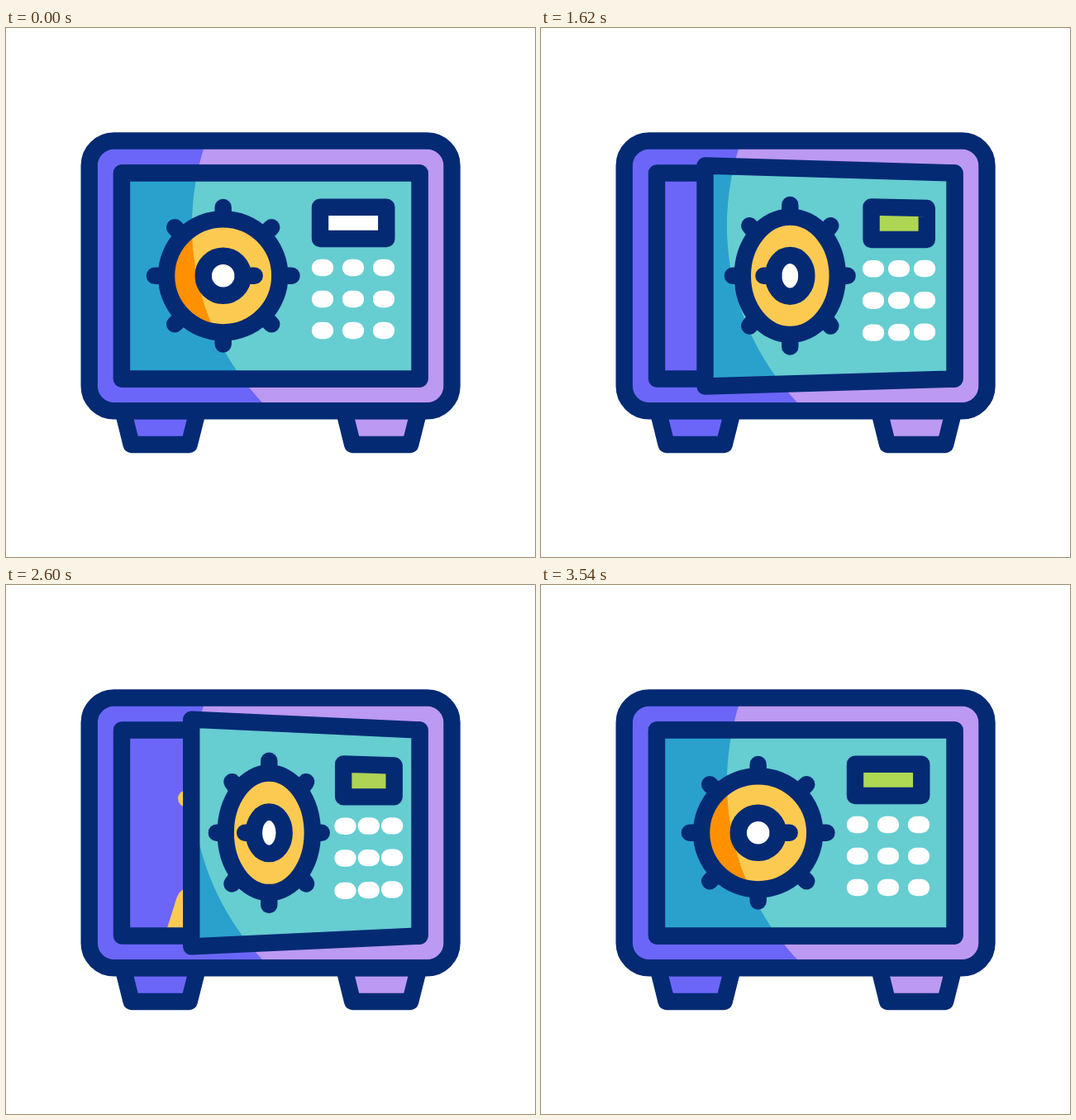
An HTML page with a canvas that plays this animation: 640x640 px, repeating every 3600 ms.

```html
<!DOCTYPE html>
<html lang="en">
<head>
<meta charset="utf-8">
<title>Safe</title>
<style>
html, body { margin: 0; width: 100%; height: 100%; overflow: hidden; background: #fff; }
canvas { display: block; }
</style>
</head>
<body>
<canvas id="stage" width="640" height="640"></canvas>
<script>
const ctx = document.getElementById('stage').getContext('2d');
const LOOP = 3600, HINGE = 500.5, DOOR_LEFT = 140, TOP = 175.5, BOTTOM = 424.5, MID = 299.8;
const NAVY = '#042a74', PURPLE = '#6b66f8', YELLOW = '#fdca51', ORANGE = '#ff9100';

// Every two-tone surface shares one fixed circular shadow edge.
function twoTone(light, dark) {
  const g = ctx.createRadialGradient(537, 239, 311.6, 537, 239, 312.4);
  g.addColorStop(0, light);
  g.addColorStop(1, dark);
  return g;
}
const BODY = twoTone('#bc99f3', PURPLE);
const DOOR = twoTone('#66cdd1', '#2aa1cd');
const DIAL = twoTone(YELLOW, ORANGE);

// Symmetric cubic-bezier(a, 0, 1 - a, 1) between two times.
function ease(t, from, to, a) {
  const x = Math.min(1, Math.max(0, (t - from) / (to - from)));
  let lo = 0, hi = 1;
  for (let i = 0; i < 24; i++) {
    const s = (lo + hi) / 2, r = 1 - s;
    if (3 * a * s * r * r + 3 * (1 - a) * s * s * r + s * s * s < x) lo = s; else hi = s;
  }
  return lo * lo * (3 - 2 * lo);
}

function paint(path, fill, stroke = NAVY) {
  if (fill) { ctx.fillStyle = fill; ctx.fill(path); }
  if (stroke) { ctx.strokeStyle = stroke; ctx.stroke(path); }
}

function shape(points, closed = true) {
  const p = new Path2D();
  points.forEach(([x, y]) => p.lineTo(x, y));
  if (closed) p.closePath();
  return p;
}

function ellipse(x, y, rx, ry) {
  const p = new Path2D();
  p.ellipse(x, y, rx, ry, 0, 0, 2 * Math.PI);
  return p;
}

function drawBody() {
  for (const x of [0, 267.5])
    paint(shape([[141.5 + x, 463], [151.7 + x, 504], [221.7 + x, 504], [232 + x, 463]]), BODY);
  const box = new Path2D();
  box.roundRect(100.7, 136.5, 438.8, 326.7, 30);
  paint(box, BODY);
}

function drawIngot(x, y, color) {
  ctx.save();
  ctx.translate(x, y);
  paint(new Path2D('M-43.5 0L-30-43Q-26-56-15-56H15Q26-56 30-43L43.5 0Z'), color, null);
  ctx.restore();
}

function drawStar(t) {
  const size = 70 * ease(t, 1600, 2000, 1 / 3) * (1 - ease(t, 2200, 2600, 1 / 3));
  const turn = (t - 1600) * 0.18 * Math.PI / 180;
  const star = new Path2D();
  for (let i = 0; i < 4; i++) {
    const a = turn + i * Math.PI / 2, b = a + Math.PI / 4, far = size * 1.414;
    star.arc(218.3 + far * Math.cos(b), 258.5 + far * Math.sin(b), size,
      b + Math.PI * 1.25, b + Math.PI * 0.75, true);
  }
  star.closePath();
  if (size < 0.5) paint(ellipse(218.3, 258.5, 10.2, 10.2), YELLOW, null);
  else paint(star, '#fff', YELLOW);
}

function drawInside(t) {
  const frame = shape([[DOOR_LEFT, TOP], [HINGE, TOP], [HINGE, BOTTOM], [DOOR_LEFT, BOTTOM]]);
  paint(frame, PURPLE, null);
  ctx.save();
  ctx.clip(frame);
  drawIngot(324.5, 311, YELLOW);
  for (const x of [280.5, 368.5]) drawIngot(x, 367, ORANGE);
  for (const x of [236, 324, 412]) drawIngot(x, 423, YELLOW);
  ctx.restore();
  paint(frame);
  drawStar(t);
}

function drawDial(px, scale, shift, turn) {
  const cx = px(262.7), tall = 1 + shift * 0.00063;
  const at = (r, a) => [cx + r * scale * Math.cos(a), MID + r * tall * Math.sin(a)];
  const spoke = (from, to, a) => paint(shape([at(from, a), at(to, a)], false));
  const ring = (r, fill) => paint(ellipse(cx, MID, r * scale, r * tall), fill);
  for (let i = 0; i < 8; i++) spoke(68.6, 82.8, turn + i * Math.PI / 4);
  ring(68.6, DIAL);
  ring(24, '#fff');
  spoke(24, 38, turn);
}

function drawPanel(px, shift, lit) {
  const k = shift / 241;
  for (let row = 0; row < 3; row++) {
    for (let col = 0; col < 3; col++) {
      const x = px(383 + 37 * col);
      const drop = [5, 7, 11][row] - col * [0.5, 1, 2][row];
      const y = 290 + 38 * row + drop * k;
      paint(shape([[x - 3, y], [x + 3, y]], false), null, '#fff');
    }
  }
  const fade = (shift / 262) ** 2;
  const color = lit ? `rgb(175,${216 - 50 * fade},${83 + 8 * fade})` : '#fff';
  paint(shape([[px(380), 216.8 - k], [px(460.3), 216.8 + 5 * k],
    [px(460.3), 255 + 4 * k], [px(380), 255 + 4 * k]]), color);
}

function drawDoor(t) {
  const shift = 262 * (ease(t, 1370, 2120, 0.45) - ease(t, 2150, 2900, 0.45));
  const turn = Math.PI * (ease(t, 600, 1370, 0.6) - ease(t, 2900, 3540, 0.6));
  const lit = t >= 620 || (t >= 160 && t < 420);
  const scale = 1 - shift / (HINGE - DOOR_LEFT), grow = shift * 0.153;
  const px = x => HINGE - (HINGE - x) * scale;
  const door = shape([[px(DOOR_LEFT), TOP - grow], [HINGE, TOP],
    [HINGE, BOTTOM], [px(DOOR_LEFT), BOTTOM + grow]]);
  paint(door, DOOR, null);
  drawPanel(px, shift, lit);
  drawDial(px, scale, shift, turn);
  paint(door);
}

function frame(now) {
  const t = now % LOOP;
  ctx.fillStyle = '#fff';
  ctx.fillRect(0, 0, 640, 640);
  ctx.lineWidth = 20.4;
  ctx.lineCap = ctx.lineJoin = 'round';
  drawBody();
  drawInside(t);
  drawDoor(t);
  requestAnimationFrame(frame);
}
frame(performance.now());
</script>
</body>
</html>
```
